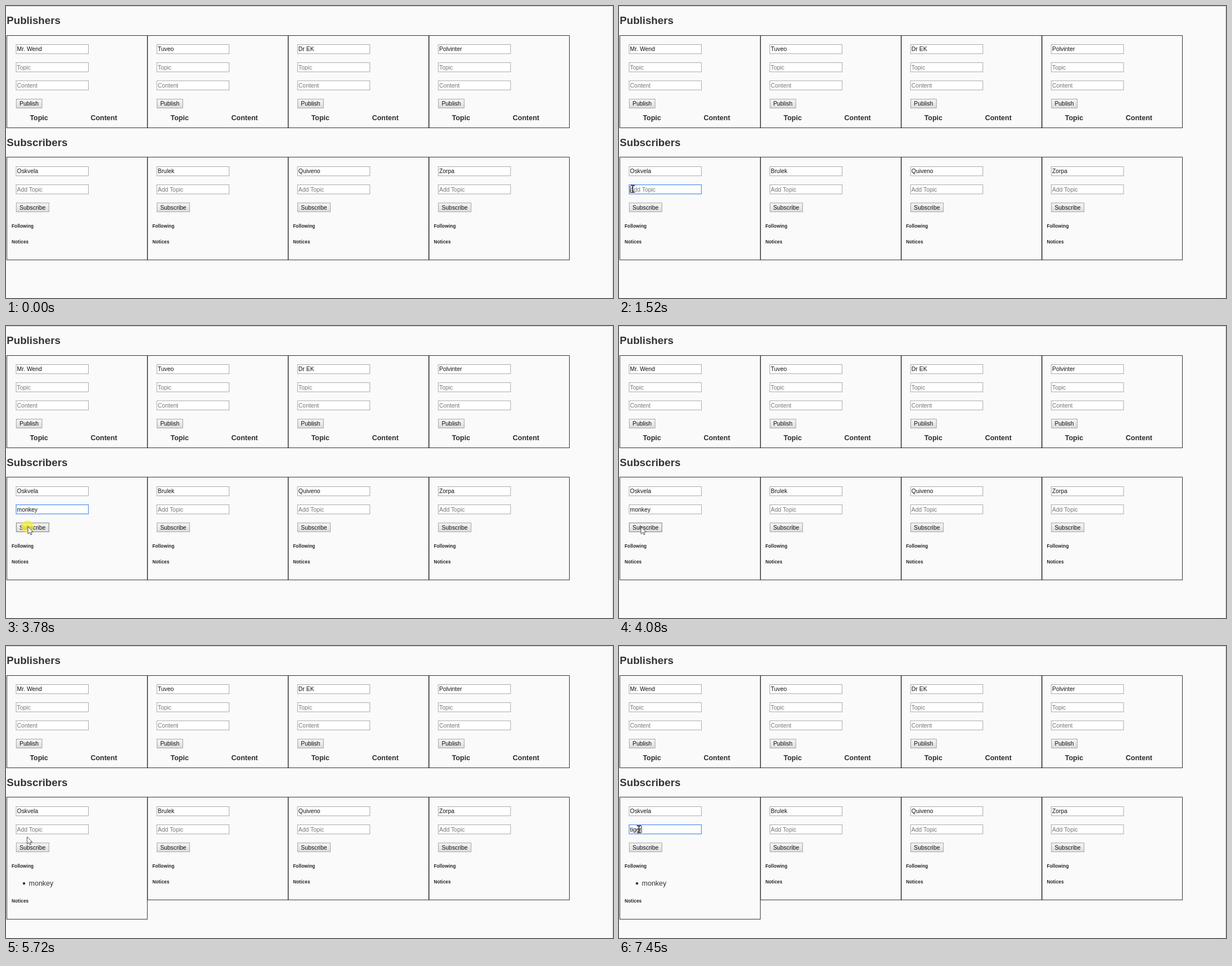
Animation, 1079 px wide and 519 px high, one loop 8000 ms. Source, as an HTML page:

```html
<!DOCTYPE html>
<html lang="en">
<head>
<meta charset="utf-8">
<title>Publishers and subscribers</title>
<style>
  html, body { margin: 0; width: 100%; height: 100%; overflow: hidden; background: #fafafa; }
  svg { display: block; width: 1079px; height: 519px; }
  text { font: 10.4px "Liberation Sans", Arial, sans-serif; fill: #111; white-space: pre; }
  .h1 { font-size: 18.7px; font-weight: bold; fill: #333; }
  .th { font-size: 12.48px; font-weight: bold; fill: #2b2b2b; text-anchor: middle; }
  .h6 { font-size: 8.2px; font-weight: bold; fill: #222; letter-spacing: .1px; }
  .li { font-size: 12.48px; fill: #333; }
  .hint { fill: #757575; }
  .panel { fill: none; stroke: #000; stroke-width: .8; }
  .input { fill: #fff; stroke: #a9a9a9; }
  .input.focus { stroke: #5c97ef; stroke-width: 1.3; }
  .button { fill: url(#up); stroke: #a6a6a6; }
  .button.hover { stroke: #7c7c7c; }
  .button.down { fill: url(#down); }
</style>
</head>
<body>
<svg viewBox="0 0 1079 519">
  <defs>
    <linearGradient id="up" x2="0" y2="1"><stop stop-color="#f6f6f6"/><stop offset="1" stop-color="#dcdcdc"/></linearGradient>
    <linearGradient id="down" x2="0" y2="1"><stop stop-color="#dcdcdc"/><stop offset="1" stop-color="#f2f2f2"/></linearGradient>
  </defs>
  <path d="M0 .5H1078.5V519" fill="none" stroke="#ccc"/>
  <g id="page"></g>
  <g id="popup">
    <rect x="-5" y="507.5" width="366.5" height="20" rx="3" fill="#fff" stroke="#dedede"/>
    <text x="-2" y="521" class="hint">Connecting...</text>
  </g>
  <circle id="spot" r="10.7" fill="#f7ee2e" opacity=".72"/>
  <rect id="caret" y="320" width=".9" height="12" fill="#111"/>
  <path id="beam" d="M-3.8-6.2H-1Q0-6.2 0-5Q0-6.2 1-6.2H3.8M0-5V5M-3.8 6.2H-1Q0 6.2 0 5Q0 6.2 1 6.2H3.8" fill="none" stroke="#000" stroke-width="1.3"/>
  <path id="arrow" d="M0 0V13L3 10.3L5 14.6L7 13.7L5.2 9.6H9.3Z" fill="#fff" stroke="#222" stroke-width=".8"/>
</svg>
<script>
const LOOP = 8000, COLUMN = 250.13;
const publishers = ["Mr. Wend", "Tuveo", "Dr EK", "Polvinter"];
const subscribers = ["Oskvela", "Brulek", "Quiveno", "Zorpa"];
const $ = id => document.getElementById(id);

const text = (x, y, s, cls = "", id = "") => `<text id="${id}" x="${x}" y="${y}" class="${cls}">${s}</text>`;
const box = (cls, x, y, w, h, id = "") => `<rect id="${id}" class="${cls}" x="${x}" y="${y}" width="${w}" height="${h}"/>`;
const input = (y, s, cls, id = "") =>
  box("input", 18, y, 128.5, 16.3, id && id + "Box") + text(19.6, y + 11.8, s, cls, id);
const button = (y, w, s, id) => box("button", 18.3, y, w, 15.8, id) + text(24, y + 11.6, s);
const columns = (names, draw) =>
  names.map((name, i) => `<g transform="translate(${COLUMN * i})">${draw(name, i)}</g>`).join("");

$("page").innerHTML =
  text(1.3, 32.4, "Publishers", "h1") +
  columns(publishers, name =>
    box("panel", 1.6, 52.6, 249.6, 164) +
    input(68.5, name) + input(100.7, "Topic", "hint") + input(132.9, "Content", "hint") +
    button(165.5, 45.8, "Publish") +
    text(58.6, 203.2, "Topic", "th") + text(174, 203.2, "Content", "th")) +
  text(1.3, 248.8, "Subscribers", "h1") +
  columns(subscribers, (name, i) => {
    const id = s => i ? "" : s;
    return box("panel", 1.6, 268.7, 249.6, 182.5, id("panel")) +
      input(285.5, name) + input(317.7, "Add Topic", "hint", id("topic")) +
      button(350, 58, "Subscribe", id("subscribe")) +
      text(10, 393.8, "Following", "h6") + text(10, 422, "Notices", "h6", id("notices"));
  }) +
  `<g id="item"><circle cx="32" cy="422" r="2.2" fill="#333"/>${text(40.6, 426, "monkey", "li")}</g>`;

const within = (t, a, b) => t >= a && t < b;
const show = (id, on) => $(id).style.display = on ? "" : "none";

// Pointer moves: start, step length, then one place per step (held until the next move)
const moves = [
  [0, 70, null, [799, 505], [217, 390], null],
  [590, 78, [8, 329], [13, 328], [18.5, 327], [21, 326], [23, 325.5], [24, 325], [24.5, 325]],
  [3330, 70, [25, 327], [27, 332], [31, 341], [36, 351], [39, 356.5]],
  [5480, 80, [39, 354], [39, 350], [38, 345], [37.5, 339], [37, 333], [36.5, 329], [36, 327], [35.5, 325.7]]
];
function pointer(t) {
  const [start, step, ...places] = moves.findLast(m => t >= m[0]);
  return places[Math.min(places.length - 1, Math.floor((t - start + 1) / step))];
}

// Time of each key press
const words = [
  ["monkey", [1900, 2050, 2220, 2370, 2540, 2770], 5090],
  ["tiger", [6890, 6980, 7130, 7300, 7450], LOOP]
];
function typed(t) {
  const [word, keys] = words.find(w => t < w[2]);
  return word.slice(0, keys.filter(k => t >= k).length);
}

function draw(t) {
  const value = typed(t), done = t >= 5090;
  const focus = within(t, 1290, 3850) || t >= 6190;
  const topic = $("topic");
  topic.textContent = value || "Add Topic";
  topic.setAttribute("class", value ? "" : "hint");
  $("topicBox").setAttribute("class", focus ? "input focus" : "input");

  show("caret", within(t, 1290, 1820) || within(t, 1900, 3330) || within(t, 6190, 6740) || t >= 6890);
  $("caret").setAttribute("x", 19.4 + (value ? topic.getComputedTextLength() : 0));

  show("item", done);
  $("panel").setAttribute("height", done ? 217 : 182.5);
  $("notices").setAttribute("y", done ? 456.4 : 422);
  show("popup", within(t, 4480, 5480));

  const p = pointer(t), [x, y] = p || [0, 0];
  const beam = x >= 18 && within(y, 317, 334);
  const hover = within(x, 18, 77) && within(y, 350, 366);
  show("beam", p && beam);
  show("arrow", p && !beam);
  show("spot", within(t, 1290, 1520) || within(t, 3780, 4010) || within(t, 6190, 6420));
  for (const id of ["beam", "arrow"]) $(id).setAttribute("transform", `translate(${x} ${y})`);
  $("spot").setAttribute("transform", `translate(${x - .8} ${y})`);
  $("subscribe").setAttribute("class",
    "button" + (hover ? " hover" : "") + (within(t, 3850, 4080) ? " down" : ""));
}

function frame() {
  draw(performance.now() % LOOP);
  requestAnimationFrame(frame);
}
frame();
</script>
</body>
</html>
```
